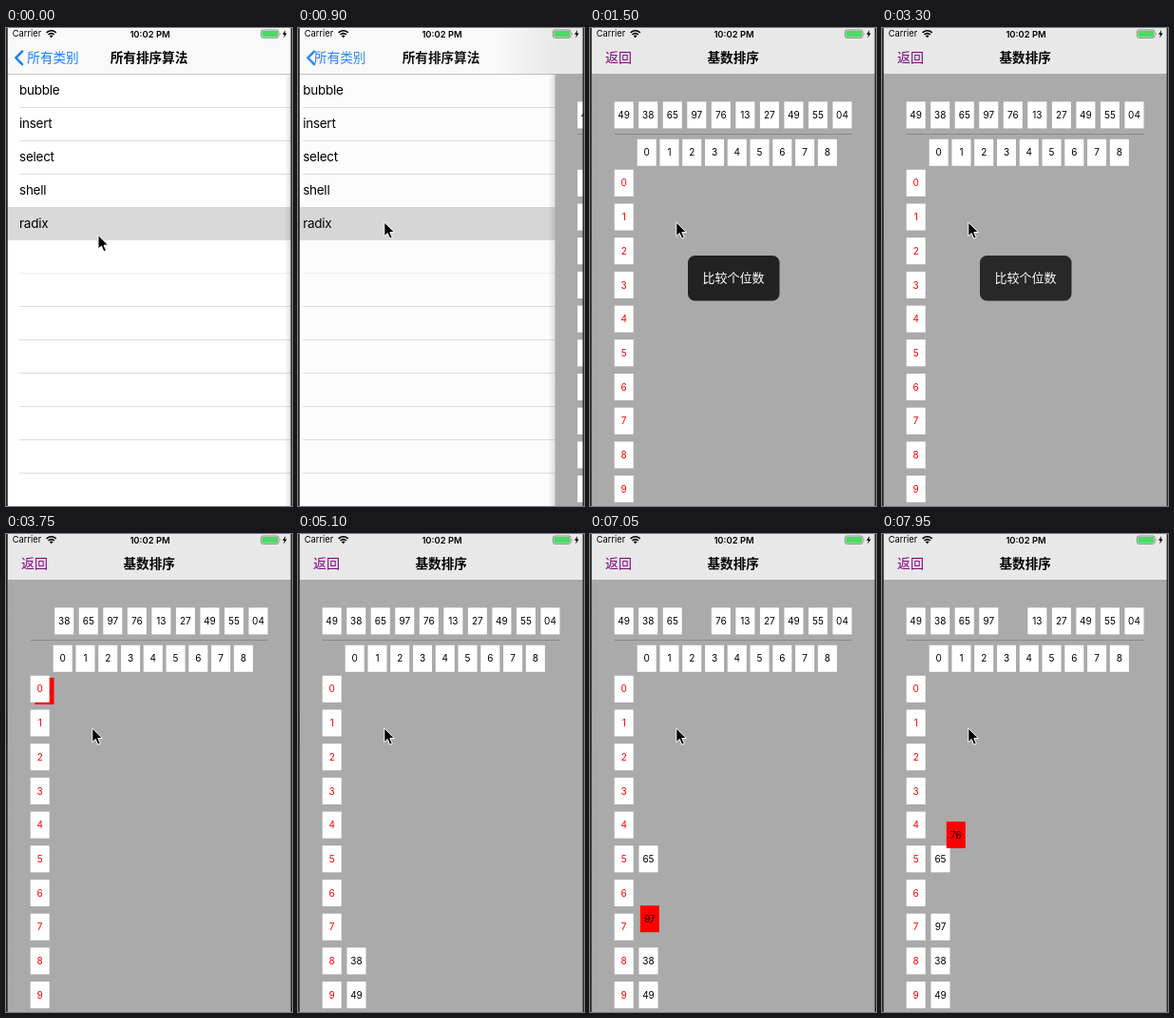
Recreate the animation shown at these times as an HTML page. Size 301x502 px, loop 8 s.

```html
<!DOCTYPE html>
<html lang="zh-CN">
<head>
<meta charset="utf-8">
<style>
html, body { margin: 0; width: 100%; height: 100%; overflow: hidden; background: #fff; }
svg { display: block; width: 301px; height: 502px; }
text { font-family: Inter, Roboto, sans-serif; }
.cjk { font-family: "Noto Sans CJK SC", "Noto Sans CJK", sans-serif; font-size: 13.6px; }
.num { font-size: 10px; text-anchor: middle; }
.row { font-size: 13.5px; letter-spacing: -.25px; }
.bold { font-weight: 700; }
</style>
</head>
<body>
<svg viewBox="0 0 301 502">
  <defs>
    <linearGradient id="blur"><stop offset="0" stop-color="#e8e8e8" stop-opacity="0"/><stop offset="1" stop-color="#e8e8e8"/></linearGradient>
    <linearGradient id="shade"><stop offset="0" stop-opacity="0"/><stop offset="1" stop-opacity=".12"/></linearGradient>
    <clipPath id="backMask"><path d="M12 20H301V44H12Z"/></clipPath>
  </defs>
  <rect width="301" height="502" fill="#fff"/>
  <g id="list"></g>
  <rect id="dim" width="301" height="502"/>
  <g id="page">
    <rect x="-5" width="7" height="502" fill="url(#shade)"/>
    <rect x="2" width="299" height="502" fill="#aaa"/>
    <path d="M26 111.5H276" stroke="#888"/>
    <g id="tiles"></g>
    <g id="toast">
      <rect x="103" y="239" width="96.5" height="47.5" rx="7.5" fill="#222"/>
      <text class="cjk" x="151" y="267.3" fill="#fff" text-anchor="middle" style="font-size:13px">比较个位数</text>
    </g>
  </g>
  <rect width="301" height="48.5" fill="#f9f9f9"/>
  <g id="barTint">
    <rect x="-60" width="62" height="48.5" fill="url(#blur)"/>
    <rect x="2" width="299" height="48.5" fill="#e8e8e8"/>
  </g>
  <path d="M0 48.5H301" stroke="#000" stroke-opacity=".22"/>
  <path id="chevron" d="M17.8 23.8L10.4 31.3L17.8 38.8" fill="none" stroke="#147efb" stroke-width="2.4"/>
  <g clip-path="url(#backMask)"><text id="backOld" class="cjk" x="22.3" y="36.2" fill="#147efb">所有类别</text></g>
  <text id="backNew" class="cjk" x="16" y="36.4" fill="#800080" style="font-size:14px">返回</text>
  <text id="titleOld" class="cjk bold" x="150.5" y="36.2" text-anchor="middle">所有排序算法</text>
  <text id="titleNew" class="cjk bold" x="150.7" y="36.2" text-anchor="middle">基数排序</text>

  <text x="6.8" y="9.4" font-size="9.3">Carrier</text>
  <g fill="none" stroke="#000" stroke-width="1.6">
    <path d="M42.6 4.9Q47.7 .6 52.8 4.9M44.5 7Q47.7 4.4 50.9 7"/>
  </g>
  <path d="M45.8 8.2Q47.7 6.8 49.6 8.2L47.7 10.2Z"/>
  <text x="151.5" y="9.5" font-size="9.4" font-weight="600" text-anchor="middle">10:02 PM</text>
  <rect x="268.4" y="2" width="18.6" height="8.4" rx="2" fill="none" stroke="#777" stroke-width=".8"/>
  <rect x="269.4" y="3" width="16.6" height="6.4" rx="1" fill="#4cd964"/>
  <path d="M288 4.7Q289.3 6.2 288 7.7Z" fill="#777"/>
  <path d="M294.2 2L291 6.8H293L292.2 10.4L295.6 5.5H293.5Z"/>
  <path d="M0 0H1.8V502H0ZM299.6 0H301V502H299.6Z" fill="#2b2b2e"/>
  <path id="cursor" d="M0 0V14.6L3.4 11.5L5.9 17.2L8.5 16.1L6 10.6H10.6Z" stroke="#fff" stroke-width="1"/>
</svg>
<script>
const LOOP = 8000, STEP = 150;
const $ = id => document.getElementById(id);
const clamp = v => Math.min(1, Math.max(0, v));

function add(parent, tag, attrs, label) {
  const el = document.createElementNS("http://www.w3.org/2000/svg", tag);
  for (const k in attrs) el.setAttribute(k, attrs[k]);
  if (label !== undefined) el.textContent = label;
  return parent.appendChild(el);
}

function move(el, x, y = 0) { el.setAttribute("transform", `translate(${x} ${y})`); }
function fade(el, a) { el.setAttribute("opacity", a); }

// Standard ease-in-out: cubic-bezier(.42, 0, .58, 1)
function ease(u) {
  u = clamp(u);
  let lo = 0, hi = 1, s = .5;
  for (let i = 0; i < 24; i++) {
    s = (lo + hi) / 2;
    const x = 3 * s * (1 - s) * (.42 * (1 - s) + .58 * s) + s ** 3;
    if (x < u) lo = s; else hi = s;
  }
  return s * s * (3 - 2 * s);
}

// Algorithm list
const ROW = 34.9, TOP = 48.4;
add($("list"), "rect", { x: 0, y: TOP + 4 * ROW, width: 301, height: ROW, fill: "#d9d9d9" });
for (let i = 1; i <= 12; i++) {
  if (i === 4 || i === 5) continue;
  add($("list"), "rect", { x: 14, y: Math.floor(TOP + i * ROW), width: 360, height: 1, fill: i === 6 ? "#efefef" : "#dedee0" });
}
["bubble", "insert", "select", "shell", "radix"].forEach((name, i) =>
  add($("list"), "text", { class: "row", x: 14, y: TOP + i * ROW + 22 }, name));

// Number tiles
function tile(label, x, y, color = "#000") {
  const g = add($("tiles"), "g", {});
  const box = add(g, "rect", { width: 20, height: 28, fill: "#fff" });
  add(g, "text", { class: "num", x: 10, y: 17.7, fill: color }, label);
  move(g, x, y);
  return { g, box };
}

const values = ["49", "38", "65", "97", "76", "13", "27", "49", "55", "04"];
const slotX = i => 25.7 + 25.53 * i, slotY = 77.4;
const bucketX = 51.5, bucketY = d => 148.8 + 35.7 * d;
const MOVES = 5, FIRST = 3600, GAP = 1002.5, MOVE_TIME = 500;

const placed = values.slice(0, MOVES).map(v => tile(v, bucketX, bucketY(+v[1])));
const slots = values.map((v, i) => tile(v, slotX(i), slotY));
for (let i = 0; i < 9; i++) tile(i, 49.7 + 23.77 * i, 116.8);
for (let i = 0; i < 10; i++) tile(i, 25.7, bucketY(i), "#f00");

function drawTiles(t) {
  placed.forEach((p, i) => {
    const u = (t - FIRST - GAP * i) / MOVE_TIME;
    const done = u > .98, moving = u >= 0 && !done;
    const k = moving ? ease(u) : 0;
    fade(p.g, done ? 1 : 0);
    slots[i].box.setAttribute("fill", moving ? "#f00" : "#fff");
    move(slots[i].g, slotX(i) + (bucketX - slotX(i)) * k,
      slotY + (bucketY(+values[i][1]) - slotY) * k);
  });
}

// Critically damped push between the two screens
function pushAt(t) {
  if (t < 900) return 0;
  if (t >= 1500) return 1;
  const w = (t - 851) * .0108;
  return 1 - Math.exp(-w) * (1 + w);
}

function draw(t) {
  const p = pushAt(t), off = 298 * (1 - p);
  move($("list"), -.3 * 298 * p);
  fade($("dim"), .1 * p);
  move($("page"), off);
  move($("barTint"), off + (p ? 0 : 70));
  fade($("chevron"), clamp(1 - p) ** .9);
  move($("backOld"), -53 * p);
  fade($("backOld"), 1 - p);
  fade($("backNew"), p);
  fade($("titleOld"), clamp(1 - p * .8 - (p > .8 ? p - .8 : 0)));
  move($("titleNew"), 195 * (1 - p));
  fade($("titleNew"), clamp(p * 1.2));
  fade($("toast"), ease((t - 970) / 200) * (1 - ease((t - 3270) / 200)));

  const c = ease(t / 600);
  move($("cursor"), 97 - 6.2 * c, 217.5 - 13.5 * c);
  drawTiles(t);
}

const start = performance.now();
function tick() {
  const t = Math.max(0, performance.now() - start) % LOOP;
  draw(Math.floor(t / STEP) * STEP);
  requestAnimationFrame(tick);
}
tick();
</script>
</body>
</html>
```
